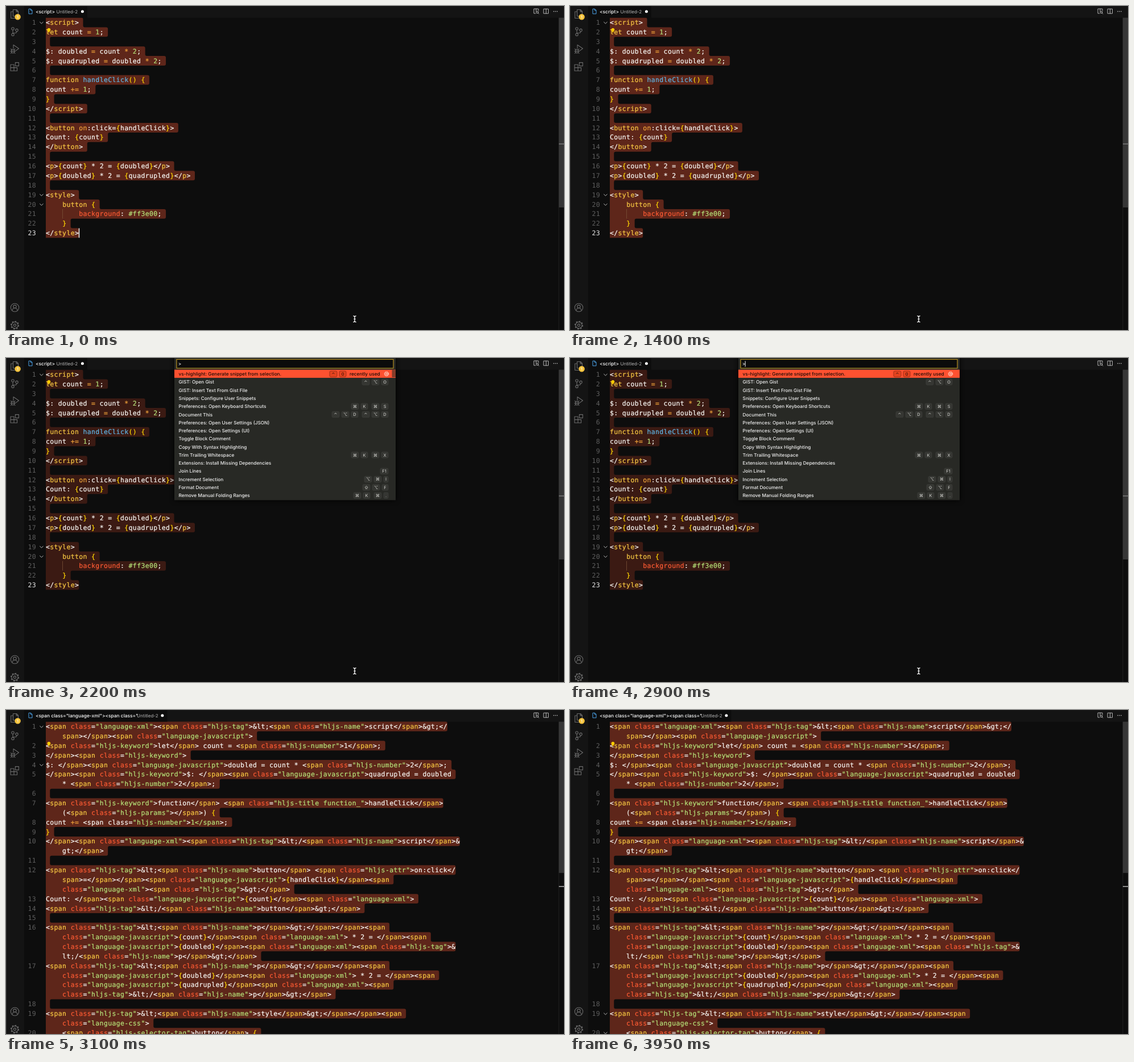
Animation, 981 px wide and 571 px high, one loop 4100 ms. Source, as an HTML page:

```html
<!DOCTYPE html>
<html lang="en">
<head>
<meta charset="utf-8">
<title>Editor: highlight snippet</title>
<style>
  html, body { margin: 0; width: 100%; height: 100%; overflow: hidden; background: #0d0d0d; }
  svg { display: block; width: 981px; height: 571px; }
  text { white-space: pre; text-rendering: geometricPrecision; }
  .code { font: 11.5px "DejaVu Sans Mono", monospace; letter-spacing: .354px; stroke-width: .22; }
  .ui { font: 500 8.24px Inter, sans-serif; fill: #f0f0f0; }
  .tab { font: 500 8.4px Inter, sans-serif; fill: #fff; }
  .key { font: 7.4px Inter, "DejaVu Sans", sans-serif; fill: #d8d8d4; text-anchor: middle; }
  .hot { fill: #1d0b06; }
  .icon { fill: none; stroke: #6a6a6a; stroke-width: 1.1; stroke-linejoin: round; stroke-linecap: round; }
</style>
</head>
<body>
<svg id="stage" viewBox="0 0 981 571" xmlns="http://www.w3.org/2000/svg"></svg>
<script>
const LOOP = 4100, X0 = 70, Y0 = 20.6, ROW = 16.864, CH = 7.278;
const INK = { w: '#f8f8f4', y: '#f7c843', o: '#eda13a', g: '#b5e279', b: '#5fb4e4', r: '#fb5a33', d: '#ffd700' };
const stage = document.getElementById('stage');

function add(parent, tag, attrs = {}, text) {
  const el = document.createElementNS('http://www.w3.org/2000/svg', tag);
  for (const k in attrs) el.setAttribute(k, attrs[k]);
  if (text !== undefined) el.textContent = text;
  return parent.appendChild(el);
}
const group = (parent = stage, attrs) => add(parent, 'g', attrs);
const rect = (p, x, y, width, height, fill, more) => add(p, 'rect', { x, y, width, height, fill, ...more });
const path = (p, d, attrs) => add(p, 'path', { d, ...attrs });
const label = (p, cls, x, y, text, more) => add(p, 'text', { class: cls, x, y, ...more }, text);

// Visible only inside the given [from, to] spans, with hard switches.
function show(el, ...spans) {
  const keys = [{ offset: 0, opacity: 0 }];
  for (const [from, to] of spans) {
    if (from === 0) keys[0].opacity = 1;
    else keys.push({ offset: from / LOOP, opacity: 1 });
    if (to < LOOP) keys.push({ offset: to / LOOP, opacity: 0 });
  }
  keys.push({ offset: 1, opacity: keys[keys.length - 1].opacity });
  keys.forEach(k => k.easing = 'step-end');
  el.animate(keys, { duration: LOOP, iterations: Infinity });
  return el;
}

function fadeOut(el, from, to) {
  el.animate([
    { offset: 0, opacity: 1 },
    { offset: from / LOOP, opacity: 1 },
    { offset: to / LOOP, opacity: 0 },
    { offset: 1, opacity: 0 }
  ], { duration: LOOP, iterations: Infinity });
}

// "^y" and the like switch the ink inside a line.
function codeRow(p, marked, row, col = 0) {
  const t = label(p, 'code', X0 + col * CH, Y0 + row * ROW + 12.5);
  ('^w' + marked).split('^').slice(1).forEach(s => {
    const ink = INK[s[0]];
    if (s.length > 1) add(t, 'tspan', { fill: ink, stroke: ink }, s.slice(1));
  });
}
const plain = s => s.replace(/\^./g, '');

function lineNumber(p, n, row, fill = '#5e5e5e') {
  label(p, 'code', 53 - String(n).length * CH, Y0 + row * ROW + 12.5, n, { fill });
}

function chevrons(p, rows) {
  for (const r of rows) {
    path(p, `M59.3 ${Y0 + r * ROW + 7.4}l3.1 3 3.1-3`, { fill: 'none', stroke: '#b9b9b9', 'stroke-width': 1 });
  }
}

// One outline down the ragged right edge, rounded at every step.
function selection(p, cols, fill) {
  const right = cols.map(c => X0 + c * CH);
  let d = `M${X0} ${Y0}H${right[0] - 3}q3 0 3 3`;
  right.forEach((a, i) => {
    const y = Y0 + (i + 1) * ROW, b = right[i + 1];
    if (b === undefined) { d += `V${y - 3}q0 3 -3 3`; return; }
    if (Math.abs(a - b) < 1) return;
    const s = Math.sign(b - a) * 3;
    d += `V${y - 3}Q${a} ${y} ${a + s} ${y}H${b - s}Q${b} ${y} ${b} ${y + 3}`;
  });
  return path(p, d + `H${X0}Z`, { fill });
}

function bulb(p, y) {
  add(p, 'circle', { cx: 75.4, cy: y, r: 2.9, fill: '#ffcc00' });
  rect(p, 74.2, y + 2.2, 2.4, 2.2, '#ffcc00');
  rect(p, 74.3, y + 4.8, 2.2, .8, '#c99c10');
}

function tab(p, right, title, nameX) {
  rect(p, 32, 0, right - 32, 20.6, '#0d0d0d');
  path(p, 'M40 5.2h3.6l2.4 2.4v6.2h-6zM43.4 5.2v2.6h2.6', { fill: 'none', stroke: '#4aa3e8', 'stroke-width': 1 });
  label(p, 'tab', 52, 13, title);
  label(p, 'ui', nameX, 13, 'Untitled-2', { style: 'font-size:8px;font-weight:400;fill:#b4b4b4' });
  add(p, 'circle', { cx: right - 8.6, cy: 9.7, r: 2.5, fill: '#fff' });
}

// Window chrome
rect(stage, 0, 0, 981, 571, '#0d0d0d');
rect(stage, 32, 0, 949, 20.6, '#141414');
rect(stage, 0, 0, 32, 571, '#141414');
rect(stage, 0, 0, 1, 571, '#303030');
const at = (x, y) => group(stage, { class: 'icon', transform: `translate(${x} ${y})` });

const files = at(15, 14);
path(files, 'M-2.5-7.5h6l3 3v8.5h-9zM3.2-7.3v3.2h3.2M-2.7-4h-3.6v11.5h8.6v-3.4');
add(files, 'circle', { cx: 5.6, cy: 5.2, r: 5.2, fill: '#f6c33c', stroke: 'none' });
label(files, 'ui', 5.4, 7.8, '1', { 'text-anchor': 'middle', style: 'font-size:7px;fill:#fff;stroke:none' });

const branch = at(15, 45);
for (const [cx, cy] of [[-3, -5], [-3, 5.4], [4, -2.4]]) add(branch, 'circle', { cx, cy, r: 2.2 });
path(branch, 'M-3-2.8v6M4-.2q0 3-4 3h-1.5q-1.5 0-1.5 1');

const debug = at(15, 76);
path(debug, 'M-2-1.5v-6l9.5 6.5-6.5 4.6');
add(debug, 'ellipse', { cx: -2.8, cy: 3.6, rx: 2.6, ry: 3.4 });
path(debug, 'M-7 3.6h8.4M-6.6-.4l2 1.6M1-.4l-2 1.6M-6.6 7.4l2-1.6M1 7.4l-2-1.6');

path(at(15, 107), 'M-7-3.8h6v11h-6zM-7 1.6h11.6v5.6h-11.6M-1 1.6h5.6M1.4-7.4h6v6h-6z');

const user = at(15.5, 531.5);
add(user, 'circle', { r: 7.2 });
add(user, 'circle', { cy: -1.8, r: 2.6 });
path(user, 'M-4.7 5.2q.5-4.2 4.7-4.2t4.7 4.2');

const gear = at(15.5, 562.5);
add(gear, 'circle', { r: 5.6 });
add(gear, 'circle', { r: 2.1 });
add(gear, 'circle', { r: 6.6, 'stroke-width': 2, 'stroke-dasharray': '2.4 2.784', 'stroke-linecap': 'butt' });

const tools = group(stage, { class: 'icon', style: 'stroke:#c4c4c4;stroke-width:.9' });
path(tools, 'M931 13h-3v-8h8v3.4M932 5v4.5M945.5 5.2h8v8h-8zM949.5 5.2v8');
add(tools, 'circle', { cx: 934, cy: 11, r: 1.8 });
path(tools, 'M935.3 12.3l1.6 1.6');
for (const cx of [963, 966, 969]) add(tools, 'circle', { cx, cy: 9.6, r: .8, fill: '#c4c4c4', stroke: 'none' });

rect(stage, 971.5, 20.6, .8, 551, '#262626');

// First document
const before = [
  '<^yscript^w>', '^ylet^w count ^o=^w ^g1^w;', '',
  '$: doubled ^o=^w count ^o*^w ^g2^w;', '$: quadrupled ^o=^w doubled ^o*^w ^g2^w;', '',
  '^yfunction^w ^bhandleClick^d() {', 'count ^o+=^w ^g1^w;', '^d}', '</^yscript^w>', '',
  '<^ybutton^w ^oon^w:click=^d{^whandleClick^d}^w>', 'Count: ^d{^wcount^d}', '</^ybutton^w>', '',
  '<^yp^w>^d{^wcount^d}^w * 2 = ^d{^wdoubled^d}^w</^yp^w>',
  '<^yp^w>^d{^wdoubled^d}^w * 2 = ^d{^wquadrupled^d}^w</^yp^w>', '',
  '<^ystyle^w>', '    ^ybutton ^d{', '        ^rbackground^w: ^g#ff3e00^w;', '    ^d}', '</^ystyle^w>'
];
const docA = show(group(), [0, 3000]);
const colsA = before.map(s => plain(s).length + 1);
colsA[22]--;
show(selection(docA, colsA, '#5e261a'), [0, 1600]);
show(selection(docA, colsA, '#3b1a13'), [1600, 3000]);
rect(docA, 99, Y0 + 20 * ROW, .8, ROW, '#7a5038');
before.forEach((s, i) => {
  lineNumber(docA, i + 1, i, i === 22 ? '#e8e8e8' : undefined);
  codeRow(docA, s, i);
});
chevrons(docA, [0, 18, 19]);
bulb(docA, 41.8);
tab(docA, 143, '<script>', 88.5);
rect(docA, 972, 20.6, 9, 334.4, '#363636');
rect(docA, 972, 242.5, 9, 1.2, '#8c8c8c');
path(docA, 'M610.4 546.2q2.6 0 2.6 2 0-2 2.6-2M613 548v7M610.4 557q2.6 0 2.6-2 0 2 2.6 2M611.4 551.6h3.2',
  { fill: 'none', stroke: '#f0f0f0', 'stroke-width': 1.4 });
show(rect(docA, 127.8, Y0 + 22 * ROW, 1.4, ROW, '#fff'), [0, 400], [900, 1400]);

// Second document; "|" is a soft wrap
const after = [
  '<span class="language-xml"><span class="hljs-tag">&lt;<span class="hljs-name">script</span>&gt;</|span></span><span class="language-javascript">',
  '<span class="hljs-keyword">let</span> count = <span class="hljs-number">1</span>;',
  '</span><span class="hljs-keyword">',
  '$: </span><span class="language-javascript">doubled = count * <span class="hljs-number">2</span>;',
  '</span><span class="hljs-keyword">$: </span><span class="language-javascript">quadrupled = doubled |* <span class="hljs-number">2</span>;',
  '',
  '<span class="hljs-keyword">function</span> <span class="hljs-title function_">handleClick</span>|(<span class="hljs-params"></span>) {',
  'count += <span class="hljs-number">1</span>;',
  '}',
  '</span><span class="language-xml"><span class="hljs-tag">&lt;/<span class="hljs-name">script</span>&|gt;</span>',
  '',
  '<span class="hljs-tag">&lt;<span class="hljs-name">button</span> <span class="hljs-attr">on:click</|span>=</span></span><span class="language-javascript">{handleClick}</span><span |class="language-xml"><span class="hljs-tag">&gt;</span>',
  'Count: </span><span class="language-javascript">{count}</span><span class="language-xml">',
  '<span class="hljs-tag">&lt;/<span class="hljs-name">button</span>&gt;</span>',
  '',
  '<span class="hljs-tag">&lt;<span class="hljs-name">p</span>&gt;</span></span><span |class="language-javascript">{count}</span><span class="language-xml"> * 2 = </span><span |class="language-javascript">{doubled}</span><span class="language-xml"><span class="hljs-tag">&|lt;/<span class="hljs-name">p</span>&gt;</span>',
  '<span class="hljs-tag">&lt;<span class="hljs-name">p</span>&gt;</span></span><span |class="language-javascript">{doubled}</span><span class="language-xml"> * 2 = </span><span |class="language-javascript">{quadrupled}</span><span class="language-xml"><span |class="hljs-tag">&lt;/<span class="hljs-name">p</span>&gt;</span>',
  '',
  '<span class="hljs-tag">&lt;<span class="hljs-name">style</span>&gt;</span></span><span |class="language-css">',
  '    <span class="hljs-selector-tag">button</span> {'
];
const braces = s => s.replace(/[{}]/g, '^d$&^w');
const markup = s => braces(s
  .replace(/"[^"]*"/g, '^g$&^w')
  .replace(/span(?=[ >])/g, '^y$&^w')
  .replace(/class(?==)/g, '^r$&^w'));
const script = 'count ^o+=^w <span class=^g"hljs-number"^w>^g1</span^w>;';

const docB = show(group(), [3000, LOOP]);
const backB = group(docB), numsB = group(docB);
const raw = show(group(docB), [3000, 3100]);
const lit = show(group(docB), [3100, LOOP]);
const colsB = [];
after.forEach((line, i) => {
  lineNumber(numsB, i + 1, colsB.length);
  const parts = line.split('|');
  parts.forEach((s, j) => {
    const row = colsB.length, col = j ? 4 : 0;
    codeRow(raw, i ? braces(s) : markup(s), row, col);
    codeRow(lit, i === 7 ? script : markup(s), row, col);
    colsB.push(col + s.length + (j === parts.length - 1 ? 1 : 0));
  });
});
selection(backB, colsB, '#5e261a');
chevrons(show(group(docB), [3000, 3200]), [0, 4]);
chevrons(show(group(docB), [3200, LOOP]), [30, 32]);
bulb(docB, 58.8);
tab(docB, 283.5, '<span class="language-xml"><span class="', 230);
rect(docB, 972, 20.6, 9, 266.6, '#363636');
rect(docB, 972, 310.4, 9, 1.3, '#d0d0d0');

// Command palette; a space separates chords
const commands = [
  ['vs-highlight: Generate snippet from selection.', '⌃0'],
  ['GIST: Open Gist', '⌃⌥O'],
  ['GIST: Insert Text From Gist File'],
  ['Snippets: Configure User Snippets'],
  ['Preferences: Open Keyboard Shortcuts', '⌘K ⌘S'],
  ['Document This', '⌃⌥D ⌃⌥D'],
  ['Preferences: Open User Settings (JSON)'],
  ['Preferences: Open Settings (UI)'],
  ['Toggle Block Comment'],
  ['Copy With Syntax Highlighting'],
  ['Trim Trailing Whitespace', '⌘K ⌘X'],
  ['Extensions: Install Missing Dependencies'],
  ['Join Lines', 'F1'],
  ['Increment Selection', '⌥⌘I'],
  ['Format Document', '⇧⌥F'],
  ['Remove Manual Folding Ranges', '⌘K ⌘.']
];
const keyWidth = { I: 8, '.': 8, F: 11, F1: 14, '⌘': 13, '⌥': 13, '⌃': 13, '⇧': 13 };

function keys(p, chords, right, y, hot) {
  const list = chords === 'F1' ? ['F1'] : [...chords];
  for (const k of list.reverse()) {
    if (k === ' ') { right -= 3; continue; }
    const w = keyWidth[k] || 12;
    rect(p, right - w, y - 5.2, w, 10.4, hot ? '#e4431f' : '#353632',
      { rx: 2, stroke: hot ? '#8f2d17' : '#3d3e3a', 'stroke-width': .8 });
    label(p, hot ? 'key hot' : 'key', right - w / 2, y + 2.7, k);
    right -= w + 4;
  }
}

const palette = show(group(), [1600, 3000]);
rect(palette, 296, -4, 389, 254.5, '#282925', { style: 'filter:drop-shadow(0 0 4px #000)' });
rect(palette, 300, 2.5, 381, 15.5, '#0b0b0b', { stroke: '#c49a22', 'stroke-width': 1.1 });
label(palette, 'ui', 302.8, 13.2, '>');
show(rect(palette, 307.6, 5.4, 1, 10, '#f4f4f4'), [1600, 2100], [2600, 3000]);
rect(palette, 296, 20.6, 389, 14.3, '#ff5130');
fadeOut(rect(palette, 678.5, 20.6, 6.5, 13.4, '#7a3a2a'), 2150, 2750);
commands.forEach(([name, chord], i) => {
  const y = 28.1 + i * 14.28;
  label(palette, i ? 'ui' : 'ui hot', 303.6, y + 3, name);
  if (chord) keys(palette, chord, i ? 672 : 598, y, !i);
});
label(palette, 'ui hot', 604, 31.1, 'recently used');
const cog = group(palette, { class: 'icon', transform: 'translate(669 28)', style: 'stroke:#ffd9cc;stroke-width:.9' });
add(cog, 'circle', { r: 3.2 });
add(cog, 'circle', { r: 1.2 });
add(cog, 'circle', { r: 3.9, 'stroke-dasharray': '1.5 1.563', 'stroke-linecap': 'butt' });
</script>
</body>
</html>
```
